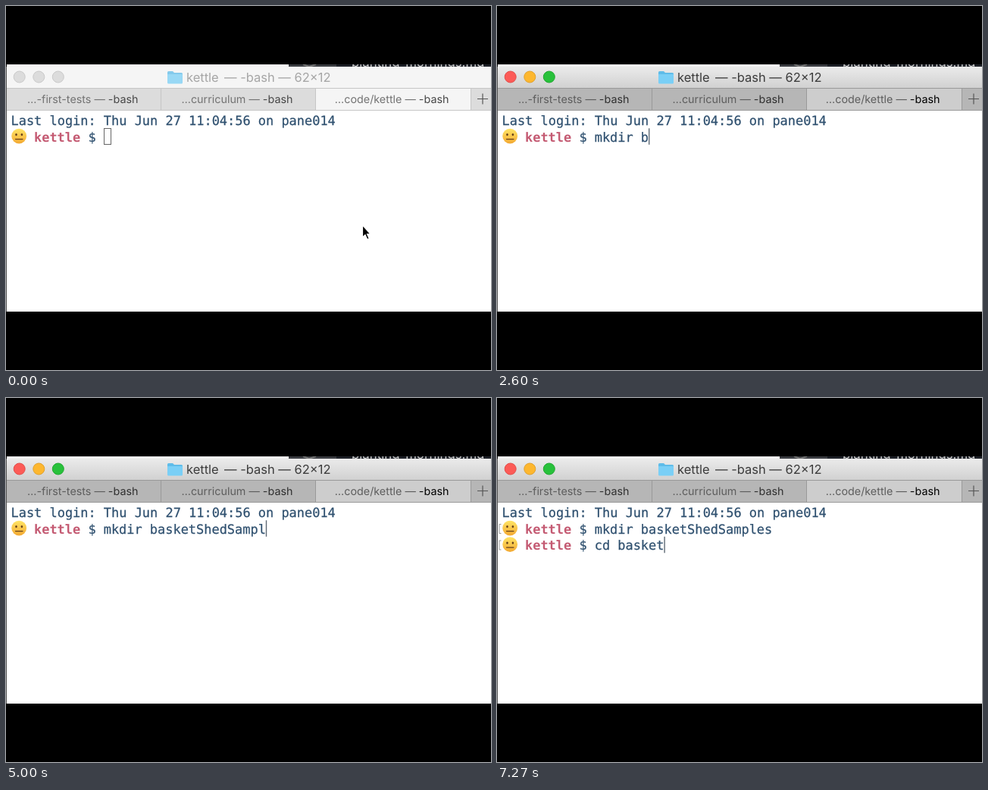
An HTML page for the animation above (8 s loop, 640 by 480 pixels).

```html
<!DOCTYPE html>
<html lang="en">
<head>
<meta charset="utf-8">
<title>Terminal</title>
<style>
html, body { margin: 0; width: 100%; height: 100%; overflow: hidden; background: #000; }
svg { display: block; width: 100vw; height: 100vh; }
text { white-space: pre; text-rendering: geometricPrecision; }
.mono { font: 16.94px "DejaVu Sans Mono", monospace; fill: #2f506f; stroke: #2f506f; stroke-width: .25; }
.dir { font-weight: 700; fill: #c45a72; stroke: none; }
.ui { font-family: Inter, sans-serif; }
.title { font-size: 16.5px; fill: #3c3c3c; }
.tab { font-size: 14.35px; fill: #5d5d5d; text-anchor: end; }
.tab tspan { fill: #303030; }
.tab.on tspan { fill: #000; }
.bar { fill: url(#bar); }
.tabs { fill: #b6b6b6; }
.front { fill: #cdcdcd; }
.rule { stroke: #999; }
.idle .title { fill: #a6a6a6; }
.idle .tab { fill: #737373; }
.idle .tab tspan, .idle .tab.on tspan { fill: #484848; }
.idle .bar, .idle .front { fill: #f5f5f5; }
.idle .tabs { fill: #dcdcdc; }
.idle .rule { stroke: #c6c6c6; }
.idle .folder { opacity: .75; }
.idle .light { fill: #dcdcdc; stroke: #c9c9c9; }
</style>
</head>
<body>
<svg viewBox="0 0 640 480">
  <defs>
    <linearGradient id="bar" x2="0" y2="1">
      <stop stop-color="#ebebeb"/><stop offset="1" stop-color="#d0d0d0"/>
    </linearGradient>
    <linearGradient id="skin" x2="0" y2="1">
      <stop stop-color="#ffe566"/><stop offset="1" stop-color="#f3a932"/>
    </linearGradient>
    <clipPath id="strip"><path d="M373 77H640V80H373Z"/></clipPath>
    <g id="prompt">
      <circle cx="17.2" cy="-7" r="9.9" fill="url(#skin)"/>
      <ellipse cx="13.5" cy="-9" rx="1.3" ry="1.7" fill="#65401c"/>
      <ellipse cx="20.9" cy="-9" rx="1.3" ry="1.7" fill="#65401c"/>
      <path d="M12.5-3H22" stroke="#65401c" stroke-width="1.2" stroke-linecap="round"/>
      <text class="mono dir" x="37">kettle</text>
      <text class="mono" x="108.4">$</text>
    </g>
    <path id="mark" d="M5.5-12.5H3V-.5H5.5" fill="none" stroke="#999"/>
  </defs>

  <rect width="640" height="480"/>
  <rect x="1" y="77" width="372" height="8" fill="#f6f4f5"/>
  <g clip-path="url(#strip)">
    <rect x="373" y="77" width="267" height="3" fill="#3a3c41"/>
    <rect x="436" y="77" width="204" height="3" fill="#1d2027"/>
    <path d="M392 77L400 80L409 77" fill="none" stroke="#777" stroke-width="2"/>
    <text class="ui" x="456" y="79.5" font-size="16.8" fill="#ccc">planting-mornings.md</text>
  </g>

  <g id="win">
    <path d="M0 403V84Q0 80 5 80H640V403Z" fill="#fff"/>
    <path class="bar" d="M1 109V84Q1 80 5 80H640V109Z"/>
    <rect class="tabs" x="1" y="109" width="639" height="28"/>
    <rect class="front" x="409" y="109" width="204" height="28"/>
    <path class="rule" d="M1 108.5H640M1 137.5H640M204.5 109V137M408.5 109V137M613.5 109V137"/>
    <g stroke-width="1">
      <circle class="light" cx="17.7" cy="93.5" r="7.5" fill="#fc5b57" stroke="#e24b47"/>
      <circle class="light" cx="43.3" cy="93.5" r="7.5" fill="#fdb72f" stroke="#e0a02a"/>
      <circle class="light" cx="68.8" cy="93.5" r="7.5" fill="#28c13b" stroke="#1fa62e"/>
    </g>
    <g class="folder">
      <path d="M213 101V87.5Q213 86 214.5 86H220L222 88H231.5Q233 88 233 89.5V101Z" fill="#5fbce9"/>
      <path d="M213 90H233V101Q233 102.5 231.5 102.5H214.5Q213 102.5 213 101Z" fill="#7acff6"/>
    </g>
    <text class="ui title" x="238" y="99.7">kettle</text>
    <text class="ui title" x="428.5" y="99.7" text-anchor="end">— -bash — 62×12</text>
    <text class="ui tab" x="174.5" y="128">…-first-tests — <tspan>-bash</tspan></text>
    <text class="ui tab" x="378.5" y="128">…curriculum — <tspan>-bash</tspan></text>
    <text class="ui tab on" x="584.5" y="128">…code/kettle — <tspan>-bash</tspan></text>
    <path d="M622 122.5H636M629 115.5V129.5" stroke="#555" stroke-width="1.2"/>
    <path d="M.5 80V403" stroke="#555"/>
  </g>

  <text class="mono" x="6.5" y="157.2">Last login: Thu Jun 27 11:04:56 on pane014</text>
  <use href="#prompt" y="178.6"/>
  <text id="make" class="mono" x="128.7" y="178.6"></text>
  <g id="next">
    <use href="#mark" y="179"/>
    <use href="#prompt" y="200.1"/>
    <text id="go" class="mono" x="128.7" y="200.1"></text>
  </g>
  <use id="last" href="#mark" y="200.5"/>
  <rect id="box" x="129.5" y="161.5" width="9" height="21" fill="none" stroke="#666"/>
  <rect id="caret" width="1.4" height="21.5" fill="#5f6a75"/>

  <path id="arrow" d="M470.5 289V305L474 301.7L476.7 307.7L479.2 306.6L476.6 300.8H481Z" stroke="#fff" stroke-width="1.2"/>
  <path id="beam" d="M466 279.5Q470.5 279.5 470.5 282.5Q470.5 279.5 475 279.5M470.5 282V295M466 297.5Q470.5 297.5 470.5 294.5Q470.5 297.5 475 297.5M468 290.5H473" fill="none" stroke="#222" stroke-width="1.5"/>
</svg>
<script>
const LOOP = 8000, FOCUS = 1130, BLINK = 1270, ENTER = 5730, ADVANCE = 10.2;
const $ = id => document.getElementById(id);
const make = {
  text: "mkdir basketShedSamples",
  keys: [1530, 1730, 1870, 2130, 2270, 2470, 2600, 2730, 2870, 2930, 3070, 3270,
    3600, 3800, 3870, 4070, 4470, 4730, 4800, 4930, 5000, 5070, 5270]
};
const go = {
  text: "cd basket",
  keys: [6470, 6600, 6670, 6800, 6870, 7000, 7070, 7130, 7270]
};

const typed = (line, t) => line.text.slice(0, line.keys.filter(k => k <= t).length);
const show = (id, on) => $(id).setAttribute("visibility", on ? "visible" : "hidden");

function write(id, s) {
  if ($(id).textContent !== s) $(id).textContent = s;
}

function draw(t) {
  const focused = t >= FOCUS, entered = t >= ENTER, typing = t >= make.keys[0];
  const first = typed(make, t), second = typed(go, t);
  $("win").setAttribute("class", focused ? "" : "idle");
  write("make", first);
  write("go", second);
  show("next", entered);
  show("last", second === go.text);
  show("box", !focused);
  show("arrow", !focused);
  show("beam", focused && !typing);
  show("caret", typing || (focused && t < BLINK));
  $("caret").setAttribute("x", 128.6 + ADVANCE * (entered ? second : first).length);
  $("caret").setAttribute("y", entered ? 182.8 : 161.3);
}

const start = performance.now();
function tick() {
  draw((performance.now() - start) % LOOP);
  requestAnimationFrame(tick);
}
draw(0);
requestAnimationFrame(tick);
</script>
</body>
</html>
```
